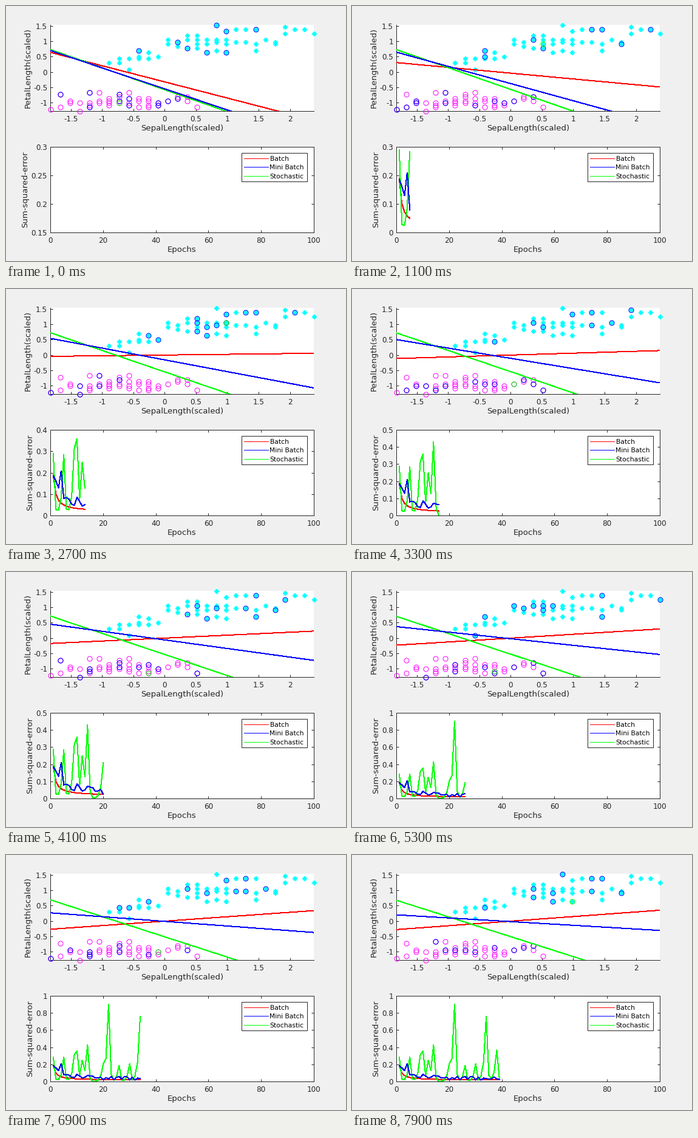
Recreate the animation shown at these times as a matplotlib script. Size 560 px wide and 420 px high, loop 8000 ms.

```python
import numpy as np
import matplotlib.pyplot as plt
from matplotlib.animation import FuncAnimation
from matplotlib.lines import Line2D
from matplotlib.markers import MarkerStyle
from matplotlib.patches import Rectangle
from matplotlib.transforms import Affine2D

W, H, DPI = 560, 420, 80
PX = 72 / DPI  # points per pixel
LEFT, RIGHT, TOP, BOTTOM = 73, 507, 31, 173  # upper panel, pixels
INK = "#262626"
RED, BLUE, LIME = "#ff0000", "#0000ff", "#00ff00"
MAGENTA, CYAN = "#ff00ff", "#00ffff"

plt.rcParams.update({"font.family": "DejaVu Sans", "axes.unicode_minus": False})


def scaled(sepal, petal):
    return (np.array([sepal, petal]).T - [5.471, 2.861]) / [0.6417, 1.4485]


def cluster(center, spread, petal_rule, noise, limits, extremes, seed):
    """Measurements on a 0.1 grid, denser near the centre, plus a few extremes."""
    u = np.linspace(-1, 1, 48)
    sepal = center + spread * u * (0.5 + 0.5 * u ** 2)
    petal = petal_rule(sepal - center)
    petal = petal + noise * np.random.default_rng(seed).standard_normal(u.size)
    pts = np.column_stack([sepal, np.clip(petal, *limits)])
    pts = np.unique(np.vstack([pts, extremes]).round(1), axis=0)
    return scaled(*pts.T)


setosa = cluster(5.0, 0.6, lambda d: 1.46 + 0 * d, 0.16, (1.2, 1.9),
                 [(4.3, 1.1), (4.6, 1.0), (4.8, 1.9), (5.1, 1.9), (5.7, 1.5),
                  (5.7, 1.7), (5.8, 1.2)], 3)
versicolor = cluster(5.95, 0.95, lambda d: 4.33 + 0.69 * d - 0.22 * d ** 2, 0.28,
                     (3.5, 4.9),
                     [(4.9, 3.3), (5.0, 3.3), (5.1, 3.0), (5.2, 3.9), (6.0, 5.1),
                      (6.7, 5.0), (7.0, 4.7)], 8)
points = np.vstack([setosa, versicolor])
(x0, y0), (x1, y1) = points.min(axis=0), points.max(axis=0)

epochs = np.arange(1, 40)
PEAKS = {1: .29, 5: .285, 9: .315, 10: .36, 12: .25, 14: .43, 20: .21, 22: .905,
         26: .19, 30: .21, 34: .765, 38: .37}


def spike(at, height):
    """A slow rise up to one epoch and a fast fall after it."""
    gap = epochs - at
    return height * np.where(gap < 0, 0.3, 0.1) ** np.abs(gap)


jitter = np.random.default_rng(5).uniform(-0.015, 0.03, epochs.size)
ERRORS = {
    RED: 0.019 + 0.171 * epochs ** -1.05,
    BLUE: np.maximum(0.035 + 0.13 * np.exp((1 - epochs) / 5) + jitter,
                     spike(4, 0.21)),
    LIME: np.max([spike(*p) for p in PEAKS.items()], axis=0),
}


def edge_rows(n):
    """Pixel rows where each boundary meets the left and right edge."""
    t = n - 1
    slow, fast = np.exp(-0.11 * t), np.exp(-0.5 * t)
    return {
        RED: (123 - 47 * slow, 89.5 + 98.5 * (0.6 * slow + 0.4 * fast)),
        LIME: (71.4 + 0.0018 * n ** 2, 223.8 - 0.3 * t),
        BLUE: (73 + 0.66 * t, 115 + 103.6 * np.exp(-0.065 * t)),
    }


fig = plt.figure(figsize=(W / DPI, H / DPI), dpi=DPI, facecolor="#f0f0f0")
pix = Affine2D().scale(1 / W, -1 / H).translate(0, 1) + fig.transFigure
half_pixel = Affine2D().translate(0.5, -0.5)


def panel(top, bottom):
    ax = fig.add_axes([LEFT / W, 1 - bottom / H, (RIGHT - LEFT) / W,
                       (bottom - top) / H])
    ax.tick_params(direction="in", length=4 * PX, width=PX, color=INK,
                   labelcolor=INK, labelsize=12 * PX)
    ax.tick_params(axis="x", pad=6.5 * PX)
    ax.tick_params(axis="y", pad=5 * PX)
    ax.xaxis.set_major_formatter("{x:g}")
    ax.yaxis.set_major_formatter("{x:g}")
    for spine in ax.spines.values():
        spine.set(color=INK, linewidth=PX)
    return ax


def write(x, y, text, size=13.2, ha="center", rotation=0, color=INK):
    return fig.text(x, y, text, transform=pix, fontsize=size * PX, ha=ha,
                    va="baseline", rotation=rotation, rotation_mode="anchor",
                    color=color)


def scatter(pts, shape, color):
    # the shift puts each marker on the middle of a pixel
    marker = MarkerStyle(shape, transform=Affine2D().translate(1 / 16, -1 / 16))
    return top.plot(pts[:, 0], pts[:, 1], marker=marker, ms=8 * PX, mew=PX,
                    mec=color, mfc="none", ls="none", clip_on=False, zorder=3,
                    antialiased=False)[0]


def thin_lines(ax):
    return {c: ax.plot([], [], color=c, lw=PX, zorder=4, antialiased=False,
                       transform=ax.transData + half_pixel)[0]
            for c in (RED, LIME, BLUE)}


top = panel(TOP, BOTTOM)
top.spines[["top", "right"]].set_visible(False)
top.set_xticks(np.arange(-1.5, 2.1, 0.5))
top.set_yticks(np.arange(-1, 1.6, 0.5))
scatter(setosa, "o", MAGENTA)
scatter(versicolor, (8, 2, 0), CYAN)
batch = scatter(points[:0], "o", BLUE)
single = scatter(points[:0], "o", LIME)
bounds = thin_lines(top)
top.set(xlim=(x0, x1), ylim=(y0, y1))
write(290, 204.5, "SepalLength(scaled)")
write(40, 102.5, "PetalLength(scaled)", rotation=90)

low = panel(232, 373)
low.tick_params(top=True, right=True)
low.set_xlim(0, 100)
curves = thin_lines(low)
write(290, 404.5, "Epochs")
low_label = write(43, 302.5, "Sum-squared-error", rotation=90)

fig.add_artist(Rectangle((388, 242), 108, 47, transform=pix, fc="white",
                         ec=INK, lw=PX))
for name, color, y in (("Batch", RED, 251), ("Mini Batch", BLUE, 265),
                       ("Stochastic", LIME, 280)):
    fig.add_artist(Line2D([392, 432], [y, y], transform=pix, color=color, lw=PX))
    write(434.5, y + 4.3, name, 10.8, "left", color="black")


def error_axis(n):
    """Lower limit, upper limit and tick step of the error axis."""
    if n == 1:
        return 0.15, 0.3, 0.05
    peak = ERRORS[LIME][:n].max()
    if peak > 0.5:
        return 0, 1, 0.2
    if peak < 0.32:
        return 0, max(0.3, peak), 0.1
    return 0, np.ceil(peak * 10) / 10, 0.1


def draw(i):
    n = 1 if i < 5 else 2 + (i - 5) // 2
    rng = np.random.default_rng(n)
    batch.set_data(*points[rng.choice(len(points), 19, replace=False)].T)
    single.set_data(*points[rng.choice(len(points), 1)].T)

    for color, rows in edge_rows(n).items():
        depth = (np.array(rows) - TOP) / (BOTTOM - TOP)
        bounds[color].set_data([x0, x1], y1 - depth * (y1 - y0))
        curves[color].set_data(epochs[:n], ERRORS[color][:n])

    lo, hi, step = error_axis(n)
    low.set_yticks(np.round(np.arange(lo, hi + 1e-6, step), 2))
    low.set_ylim(lo, hi)
    low_label.set_x(35 if n == 1 else 43)
    return []


anim = FuncAnimation(fig, draw, frames=80, interval=100, init_func=lambda: [],
                     repeat=True, repeat_delay=0, blit=False)
plt.show()
```
